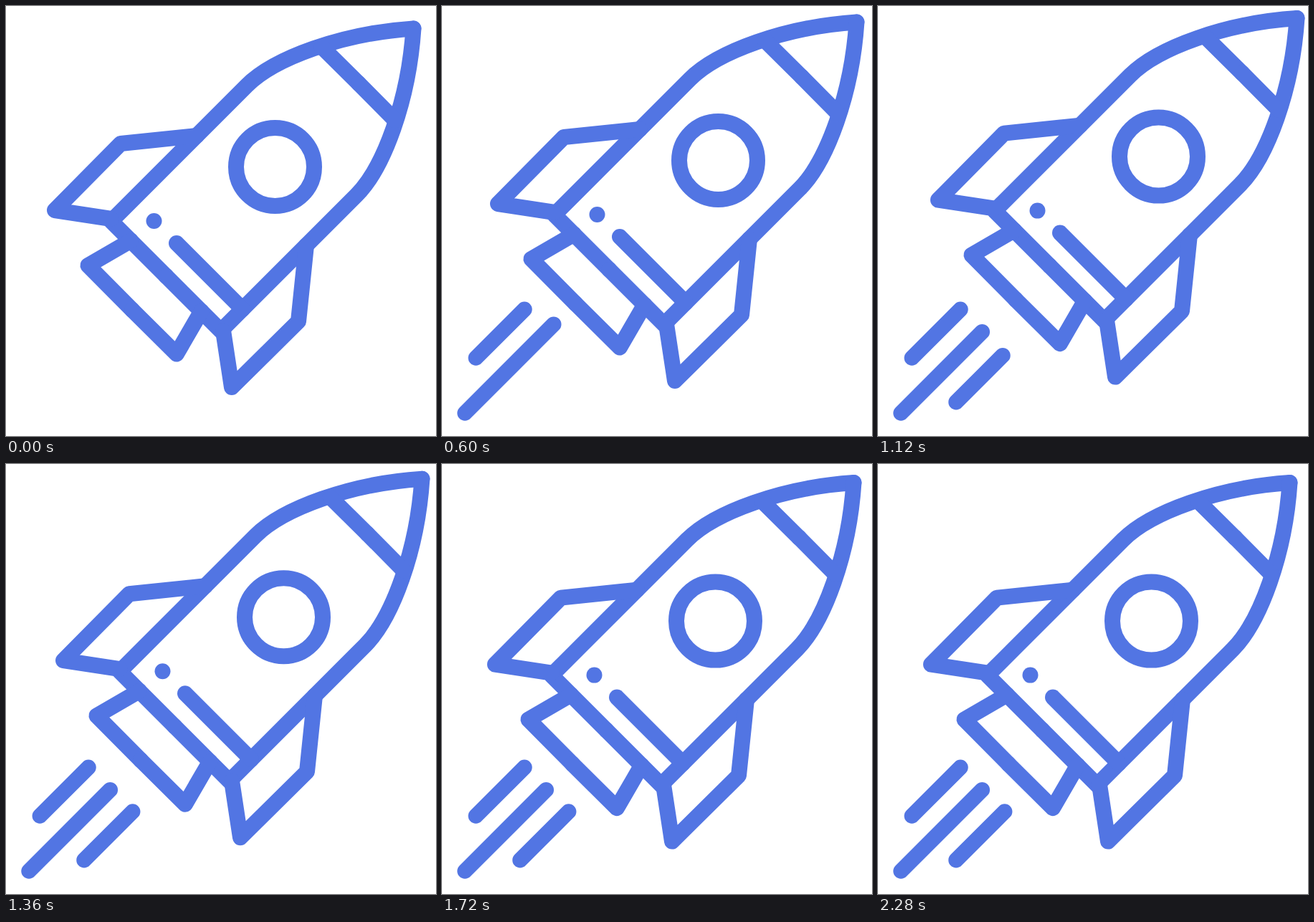
Animation of 600 by 600 pixels, one loop 2320 ms. Source, as an HTML page:

```html
<!DOCTYPE html>
<html lang="en">
<head>
<meta charset="utf-8">
<title>Rocket</title>
<style>
  html, body { margin: 0; width: 100%; height: 100%; overflow: hidden; background: #fff; }
  svg { display: block; width: 100%; height: 100%; }
</style>
</head>
<body>
<svg viewBox="0 0 600 600" fill="none" stroke="#5275e3" stroke-width="22" stroke-linecap="round" stroke-linejoin="round">
  <g id="trails" stroke-width="21.5"></g>
  <g id="rocket">
    <!-- One side of the rocket, mirrored across its axis x + y = 600 -->
    <g id="side">
      <path d="M223.25 376.75 L146.75 300.25 L336 111 C374 73 468.5 38 568.5 31.5"/>
      <path d="M266 181 L160 192 L68 285 L147 297"/>
      <path d="M174 327.5 L114.5 362 L176 424"/>
      <path d="M440.5 57 L492 108"/>
    </g>
    <use href="#side" transform="matrix(0 -1 -1 0 600 600)"/>
    <circle cx="375.5" cy="224.5" r="54.5"/>
    <path d="M238 331 L330 423"/>
    <circle cx="206.5" cy="300" r="11" fill="#5275e3" stroke="none"/>
  </g>
</svg>
<script>
  const LOOP = 2320, STEP = 40, LEG = 400;
  const rocket = document.getElementById('rocket');
  const trailBox = document.getElementById('trails');

  const easeOut = p => 1 - (1 - p) ** 2;
  const easeBack = (p, s = 1.74) => 1 + (s + 1) * (p - 1) ** 3 + s * (p - 1) ** 2;

  // Each trail grows up and to the right from its lower end.
  const trails = [
    { x: 47.3, y: 491, size: 67.7, start: 0, ease: easeOut },
    { x: 32, y: 568, size: 113.3, start: LEG, ease: easeBack },
    { x: 109, y: 552.7, size: 67.7, start: 2 * LEG, ease: easeOut }
  ];
  for (const trail of trails) {
    trail.path = document.createElementNS('http://www.w3.org/2000/svg', 'path');
    trailBox.append(trail.path);
  }

  function draw(t) {
    const phase = t % (2 * LEG) / LEG;
    const lift = 20 * (1 - Math.abs(1 - phase));
    rocket.setAttribute('transform', `translate(${lift} ${-0.9 * lift})`);

    for (const { x, y, size, start, ease, path } of trails) {
      const p = Math.min(1, (t - start) / LEG);
      const d = p > 0 ? size * ease(p) : 0;
      path.setAttribute('d', p > 0 ? `M${x} ${y} l${d} ${-d}` : '');
    }
  }

  const began = performance.now();
  function tick() {
    const t = (performance.now() - began) % LOOP;
    draw(Math.floor(t / STEP) * STEP);
    requestAnimationFrame(tick);
  }
  tick();
</script>
</body>
</html>
```
